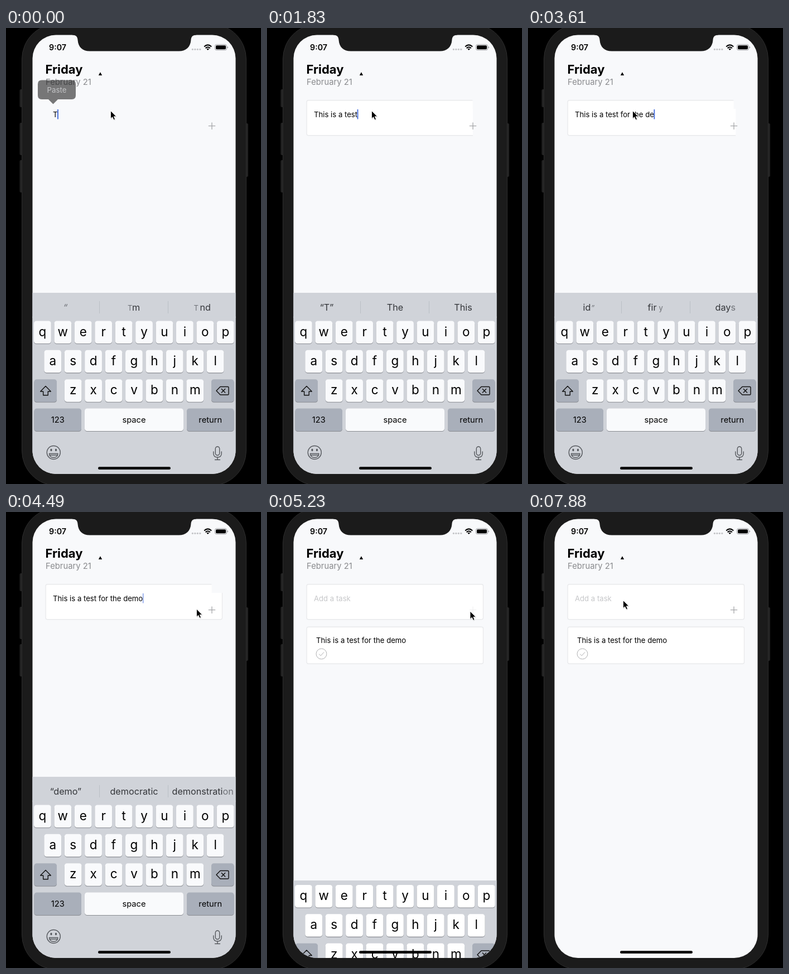
An HTML page for the animation above (8 s loop, 457 by 818 pixels).

```html
<!DOCTYPE html>
<html lang="en">
<head>
<meta charset="utf-8">
<title>Adding a task</title>
<style>
  html, body { margin: 0; width: 100%; height: 100%; overflow: hidden; background: #000; }
  svg { display: block; width: 457px; height: 818px; }
  text { font-family: Inter, Roboto, "Liberation Sans", sans-serif; white-space: pre; }
  .mid { text-anchor: middle; }
  .body { font-size: 13.15px; }
  .letter { font-size: 22.5px; }
  .label { font-size: 14.7px; }
  .hint { font-size: 16.2px; fill: #34363a; }
  .dim { fill: #707379; }
  .small { font-size: 13px; }
  .icon { fill: none; stroke: #111; stroke-width: 1.4; stroke-linejoin: round; stroke-linecap: round; }
  .soft { stroke: #55585d; }
  .card { fill: #fff; stroke: #e9eaec; stroke-width: 1.4; }
</style>
</head>
<body>
<svg viewBox="0 0 457 818" xmlns="http://www.w3.org/2000/svg">
  <defs>
    <clipPath id="screen"><rect x="47.5" y="12.5" width="364" height="787.5" rx="42"/></clipPath>
    <clipPath id="reveal"><path id="revealPath"/></clipPath>
  </defs>

  <g fill="#222">
    <rect x="24.5" y="110" width="8" height="32" rx="2"/>
    <rect x="24.5" y="170" width="8" height="58" rx="2"/>
    <rect x="24.5" y="237" width="8" height="58" rx="2"/>
    <rect x="426" y="171" width="8" height="96" rx="2"/>
  </g>
  <rect x="28.5" y="-7" width="402" height="828" rx="63" fill="#1b1b1b" stroke="#2d2d2d"/>

  <g clip-path="url(#screen)">
    <rect x="47" y="12" width="365" height="789" fill="#f8f9fb"/>
    <text x="70.5" y="82" font-size="22" font-weight="700">Friday</text>
    <text x="71" y="102" font-size="14.8" fill="#8a8b8e">February 21</text>
    <path d="M165.8 85L169 79.3L172.2 85Z"/>

    <g clip-path="url(#reveal)"><rect id="entry" class="card" x="71.2" y="129.7" width="316.3" height="63" rx="3"/></g>
    <text id="prompt" class="body" x="84" y="159.7" fill="#c6c7c9">Add a task</text>
    <text id="typed" class="body" x="84" y="159.7"></text>
    <rect id="caret" y="146" width="1.8" height="17.5" fill="#3f69dc"/>
    <path id="plus" d="M362.8 175.7H375.2M369 169.5V181.9" stroke="#a6a7aa" stroke-width="1.3"/>

    <g id="task">
      <rect class="card" x="71.2" y="206.2" width="316.3" height="66" rx="3"/>
      <text class="body" x="88" y="235">This is a test for the demo</text>
      <g fill="none" stroke="#aeafb1">
        <circle cx="97.5" cy="254.5" r="9.4"/>
        <path d="M93.2 254.8L96.3 257.8L102 251.4"/>
      </g>
    </g>

    <g id="bubble">
      <path d="M64 93.5H118Q125 93.5 125 100.5V121Q125 128 118 128H93L84.5 136.5L76 128H64Q57 128 57 121V100.5Q57 93.5 64 93.5Z" fill="#111" opacity=".56"/>
      <text class="mid" x="91" y="115.5" font-size="13.3" fill="#c3c4c6">Paste</text>
    </g>

    <g id="keyboard">
      <g id="bar">
        <rect x="47" y="475" width="365" height="45" fill="#d0d3d9"/>
        <path d="M167.5 490V512M290.5 490V512" stroke="#bbbfc6"/>
        <g id="hints"></g>
      </g>
      <rect x="47" y="517.5" width="365" height="290" fill="#d0d3d9"/>
      <g id="keys"></g>
      <path class="icon" d="M71 642.5L80.3 652H75.3V658.8H66.7V652H61.7Z"/>
      <path class="icon" d="M384 643.5H397.5Q399 643.5 399 645V656.5Q399 658 397.5 658H384L377 650.8ZM386.3 647.6L392.7 654M392.7 647.6L386.3 654"/>
      <g class="icon soft">
        <circle cx="85.3" cy="761.5" r="12"/>
        <path d="M77.5 763.5H93Q92.5 770.5 85.3 770.5Q78 770.5 77.5 763.5ZM79 766.3H91.8"/>
        <g fill="#55585d" stroke="none"><ellipse cx="81" cy="757" rx="1.6" ry="2.2"/><ellipse cx="89.5" cy="757" rx="1.6" ry="2.2"/></g>
        <rect x="375.3" y="751" width="7.4" height="15.5" rx="3.7"/>
        <path d="M371.8 760V763Q371.8 770 379 770Q386.2 770 386.2 763V760M379 770V774.5M374.5 774.5H383.5"/>
      </g>
    </g>

    <rect x="165" y="787.3" width="130" height="4.8" rx="2.4"/>
  </g>

  <path d="M119 11V12.5C126 12.8 128.2 16 128.6 22C129.4 34 137 41.5 150 41.5H310C322.5 41.5 330.6 34 331.4 22C331.8 16 334 12.8 341 12.5V11Z" fill="#1b1b1b"/>
  <text x="77" y="40" font-size="14.3" font-weight="600">9:07</text>
  <g fill="#c3c4c7">
    <circle cx="334.4" cy="38.3" r="1.6"/><circle cx="338.8" cy="38.3" r="1.6"/>
    <circle cx="343.3" cy="38.3" r="1.6"/><circle cx="347.8" cy="38.3" r="1.6"/>
  </g>
  <g fill="none" stroke="#000" stroke-width="2">
    <path d="M355.2 33.4Q361.7 27.4 368.2 33.4M357.6 36.2Q361.7 32.4 365.8 36.2"/>
    <path d="M359.4 37.6Q361.7 35.8 364 37.6L361.7 40Z" fill="#000" stroke="none"/>
  </g>
  <rect x="374.5" y="29.7" width="21" height="10" rx="2.8" fill="none" stroke="#999b9e"/>
  <rect x="376" y="31.2" width="18" height="7" rx="1.6"/>
  <path d="M396.6 33V36.6Q398.2 36 398.2 34.8T396.6 33Z" fill="#999b9e"/>

  <g id="pointer">
    <path d="M1 1.5V16L4.3 13L6.6 18L9 17L6.8 12H11.5Z" fill="#000" opacity=".18"/>
    <path d="M.5 .5V14.6L3.7 11.7L6 16.8L8.5 15.7L6.3 10.8H10.7Z" stroke="#fff" stroke-width=".9"/>
  </g>
</svg>
<script>
const LOOP = 8000;
const $ = id => document.getElementById(id);
const text = (x, y, cls, s) => `<text x="${x}" y="${y}" class="${cls}">${s}</text>`;

// Keyboard
function key(x, y, w, label, cls, dark) {
  const box = fill => `width="${w}" height="40.5" rx="4.6" ${fill}`;
  return `<rect x="${x}" y="${y + 1.1}" ${box('fill="#898c92"')}/>` +
    `<rect x="${x}" y="${y}" ${box(dark ? 'fill="#a9afba"' : 'class="lit"')}/>` +
    text(x + w / 2, y + (cls === 'letter' ? 27 : 25.8), cls + ' mid', label);
}
const row = (letters, x, y) =>
  [...letters].map((c, i) => key(x + i * 36.43, y, 30.8, c, 'letter')).join('');
$('keys').innerHTML =
  row('qwertyuiop', 50, 525.5) + row('asdfghjkl', 68.3, 577.8) + row('zxcvbnm', 104.8, 630.2) +
  key(50.5, 630.2, 40.5, '', 'label', true) + key(368, 630.2, 40.5, '', 'label', true) +
  key(50.5, 682.5, 84.5, '123', 'label', true) + key(141, 682.5, 177, 'space', 'label') +
  key(324, 682.5, 84.5, 'return', 'label', true);
const lit = document.querySelectorAll('.lit');

// Word suggestions
const trio = (...words) =>
  words.map((w, i) => text([107, 229.5, 351.5][i], 506.5, 'hint mid', w)).join('');
const at = (x, s, cls = '') => text(x, 506.5, 'hint ' + cls, s);
const next = at(98.5, 'id') + at(113, '<tspan font-style="italic">”</tspan>', 'dim small') +
  at(214.5, 'fir') + at(234.5, 'y', 'dim small');
const hints = [
  [0, at(102.5, '<tspan font-style="italic">“</tspan>', 'dim') + at(218, 'T', 'dim small') + at(226, 'm') +
      at(336.5, 'T', 'dim small') + at(347.5, 'nd')],
  [150, trio('“T”', 'The', 'This')],
  [3160, next + at(335.5, 'day')],
  [3610, next + at(335.5, 'day<tspan class="dim">s</tspan>')],
  [4190, trio('“demo”', 'democratic', '') + at(297.5, 'demonstrati<tspan class="dim">on</tspan>')]
];

// Typing: [time, number of letters]
const phrase = 'This is a test for the demo';
const typing = [
  [0, 1], [150, 2], [320, 3], [500, 5], [790, 7], [940, 9], [1090, 10], [1390, 11],
  [1540, 12], [1690, 13], [1830, 14], [1980, 15], [2120, 16], [2270, 17], [2410, 19],
  [2560, 20], [2710, 21], [2860, 22], [3010, 23], [3460, 24], [3610, 25], [3760, 26],
  [3900, 27], [5080, 0]
];
const blink = [[0, 1], [4490, .55], [4640, .1], [4780, 0], [4930, 1], [5080, 0]];
const press = [[0, 1], [4930, .6], [5080, .15], [5370, .5], [5520, 1]];
const slide = [[0, 0], [5080, 20], [5230, 143.5], [5370, 243], [5520, 281], [5660, 340]];
const edge = [[0, 369], [3610, 372.3], [4190, 400]];

// Pointer
const path = [
  [0, 187, 148], [4190, 205, 150], [4340, 290, 165], [4490, 341, 173.5], [4640, 360, 176.5],
  [4780, 363.5, 177.5], [5370, 363, 192], [5520, 345, 330], [5660, 329, 396]
];
for (let i = 0; i < 8; i++) {
  const u = i / 7, e = u * u * (3 - 2 * u);
  path.push([6260 + i * 147, 328 - 127 * e, 389 - 217 * e]);
}
path.push([7440, 195, 155], [7590, 184, 140], [7730, 175, 150], [7880, 170, 158]);

const pick = (steps, t) => steps.findLast(s => s[0] <= t);
const value = (steps, t) => pick(steps, t)[1];
const show = (id, on) => $(id).setAttribute('visibility', on ? 'visible' : 'hidden');
const set = (id, name, v) => $(id).setAttribute(name, v);
let lastHint;

function draw(t) {
  const added = t >= 5080;
  const count = value(typing, t);
  $('typed').textContent = phrase.slice(0, count);
  set('caret', 'x', 83.6 + (count ? $('typed').getComputedTextLength() : 0));
  set('caret', 'opacity', value(blink, t));
  set('plus', 'opacity', value(press, t));

  show('bubble', t < 150);
  show('entry', t >= 150);
  show('task', added);
  show('prompt', added);
  show('bar', !added);
  const r = value(edge, t), top = added ? 400 : 368.5;
  set('revealPath', 'd', `M60 120H${top}V145H${r}V200H60Z`);

  const hint = value(hints, t);
  if (hint !== lastHint) $('hints').innerHTML = lastHint = hint;
  set('keyboard', 'transform', `translate(0 ${value(slide, t)})`);
  lit.forEach(k => k.setAttribute('fill', added ? '#fff' : '#f9fafc'));

  const [, x, y] = pick(path, t);
  set('pointer', 'transform', `translate(${x} ${y})`);
}

const start = performance.now();
function tick() {
  draw((performance.now() - start) % LOOP);
  requestAnimationFrame(tick);
}
tick();
</script>
</body>
</html>
```
